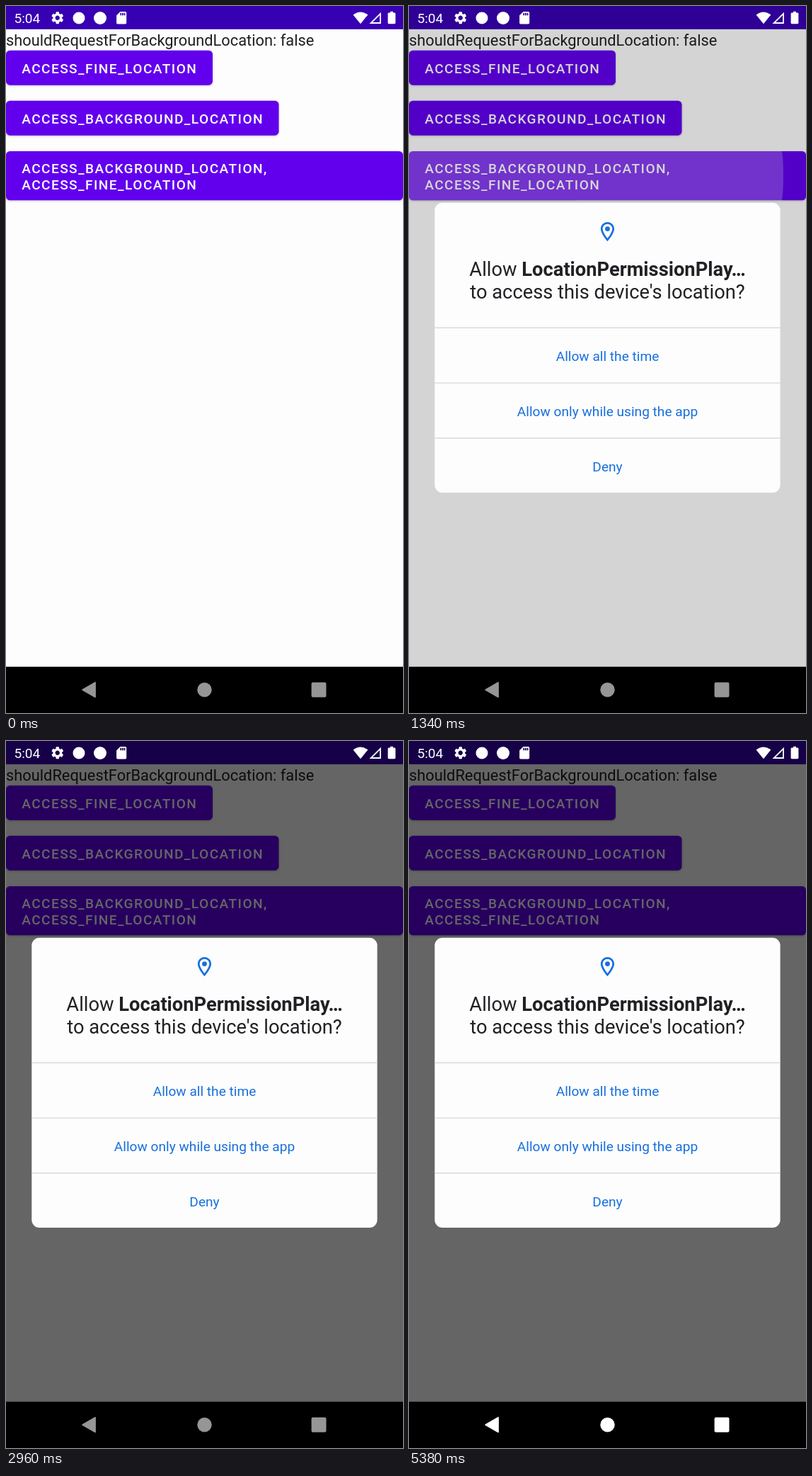
An HTML page for the animation above (5.42 s loop, 561x998 px).

```html
<!DOCTYPE html>
<html lang="en">
<head>
<meta charset="utf-8">
<title>Location permission dialog</title>
<style>
  html, body { margin: 0; width: 100%; height: 100%; overflow: hidden; background: #000; }
  svg { display: block; width: 561px; height: 998px; font-family: Roboto, sans-serif; }
  .label { font-size: 21.84px; fill: #1f1f1f; }
  .button { fill: #6200ee; filter: drop-shadow(0 1.5px 1.5px rgba(0, 0, 0, .22)); }
  .caps { font-size: 19.11px; font-weight: 500; letter-spacing: 1.42px; fill: #fff; }
  .title { font-size: 27.3px; fill: #202124; text-anchor: middle; }
  .title tspan { font-weight: 700; }
  .choice { font-size: 19.11px; fill: #176fde; text-anchor: middle; }
  .rule { stroke: #d9d9e0; stroke-width: 1.4; }
  .clock { font-size: 19.11px; }

  .ripple, .dim, .dialog, .keys, .glow { animation: 5420ms linear infinite; }
  .ripple { animation-name: spread; opacity: 0; }
  .dim { animation-name: dim; opacity: 0; }
  .dialog { animation-name: show; opacity: 0; }
  .keys { animation-name: wake; }
  .glow { animation-name: glow, widen; opacity: 0; }

  @keyframes spread {
    0%, 22.36% {
      opacity: 0;
      transform: translate(155px, 239.5px) scale(168);
      animation-timing-function: cubic-bezier(.4, 0, .2, 1);
    }
    26.51% { opacity: .24; transform: translate(280.5px, 239.5px) scale(284); }
    29.28%, 100% { opacity: 0; transform: translate(280.5px, 239.5px) scale(284); }
  }
  @keyframes dim {
    0%, 23.76% { opacity: 0; }
    27.45%, 100% { opacity: .6; }
  }
  @keyframes show {
    0%, 23.79% { opacity: 0; }
    23.8%, 100% { opacity: 1; }
  }
  @keyframes wake {
    0%, 65.31% { opacity: .59; }
    67.16%, 100% { opacity: 1; }
  }
  @keyframes glow {
    0%, 65.3% { opacity: 0; }
    65.31% { opacity: .2; }
    66.42% { opacity: .2; animation-timing-function: cubic-bezier(0, 0, .8, 1); }
    74.72%, 100% { opacity: 0; }
  }
  @keyframes widen {
    0%, 65.31% { x: 117.5px; width: 0; animation-timing-function: cubic-bezier(0, .5, .2, 1); }
    68.08%, 100% { x: 45px; width: 145px; }
  }
  /* Opacity of the press ripple is split from its spread so it can fade in faster. */
  .press { animation: press 5420ms linear infinite; }
  @keyframes press {
    0%, 22.36% { opacity: 0; }
    23.75%, 26.51% { opacity: .24; }
    29.28%, 100% { opacity: 0; }
  }
  @keyframes spread {
    0%, 22.36% {
      transform: translate(155px, 239.5px) scale(168);
      animation-timing-function: cubic-bezier(.4, 0, .2, 1);
    }
    26.51%, 100% { transform: translate(280.5px, 239.5px) scale(284); }
  }
  .ripple { opacity: 1; }
</style>
</head>
<body>
<svg viewBox="0 0 561 998">
  <defs>
    <clipPath id="wide"><rect y="205" width="561" height="69.3" rx="5.5"/></clipPath>
  </defs>

  <!-- App -->
  <rect width="561" height="933" fill="#fdfdfd"/>
  <rect width="561" height="32.8" fill="#3700b3"/>
  <text class="label" x="0" y="56">shouldRequestForBackgroundLocation: false</text>
  <rect class="button" y="62.7" width="292" height="49" rx="5.5"/>
  <rect class="button" y="133.7" width="385.5" height="49" rx="5.5"/>
  <rect class="button" y="205" width="561" height="69.3" rx="5.5"/>
  <g clip-path="url(#wide)"><g class="press"><circle class="ripple" r="1" fill="#fff"/></g></g>
  <g class="caps">
    <text x="22.2" y="94.7">ACCESS_FINE_LOCATION</text>
    <text x="22.2" y="165.7">ACCESS_BACKGROUND_LOCATION</text>
    <text x="22.2" y="236.2">ACCESS_BACKGROUND_LOCATION,</text>
    <text x="22.2" y="258.6">ACCESS_FINE_LOCATION</text>
  </g>
  <rect class="dim" width="561" height="933"/>

  <!-- Dialog -->
  <g class="dialog">
    <rect x="36.3" y="277.7" width="488.3" height="409.3" rx="10.9" fill="#fdfdfd"/>
    <g transform="translate(264.1 302.3) scale(1.365)" fill="#176fde">
      <path d="M12 2C8.13 2 5 5.13 5 9c0 5.25 7 13 7 13s7-7.75 7-13c0-3.87-3.13-7-7-7zM7 9c0-2.76 2.24-5 5-5s5 2.24 5 5c0 2.88-2.88 7.19-5 9.88C9.92 16.21 7 11.85 7 9z"/>
      <circle cx="12" cy="9" r="2.5"/>
    </g>
    <text class="title" x="280.5" y="380.5">Allow <tspan>LocationPermissionPlay…</tspan></text>
    <text class="title" x="280.5" y="412.5">to access this device's location?</text>
    <path class="rule" d="M36.3 454.2h488.3M36.3 532.1h488.3M36.3 610h488.3"/>
    <text class="choice" x="280.5" y="500.6">Allow all the time</text>
    <text class="choice" x="280.5" y="578.6">Allow only while using the app</text>
    <text class="choice" x="280.5" y="656.6">Deny</text>
  </g>

  <!-- Status bar -->
  <g fill="#fff">
    <text class="clock" x="11.5" y="23.7">5:04</text>
    <path transform="translate(62.2 6.2) scale(.88)" d="M19.14 12.94c.04-.3.06-.61.06-.94 0-.32-.02-.64-.07-.94l2.03-1.58c.18-.14.23-.41.12-.61l-1.92-3.32c-.12-.22-.37-.29-.59-.22l-2.39.96c-.5-.38-1.03-.7-1.62-.94l-.36-2.54c-.04-.24-.24-.41-.48-.41h-3.84c-.24 0-.43.17-.47.41l-.36 2.54c-.59.24-1.13.57-1.62.94l-2.39-.96c-.22-.08-.47 0-.59.22L2.74 8.87c-.12.21-.08.47.12.61l2.03 1.58c-.05.3-.09.63-.09.94s.02.64.07.94l-2.03 1.58c-.18.14-.23.41-.12.61l1.92 3.32c.12.22.37.29.59.22l2.39-.96c.5.38 1.03.7 1.62.94l.36 2.54c.05.24.24.41.48.41h3.84c.24 0 .44-.17.47-.41l.36-2.54c.59-.24 1.13-.56 1.62-.94l2.39.96c.22.08.47 0 .59-.22l1.92-3.32c.12-.22.07-.47-.12-.61l-2.01-1.58zM12 15.6c-1.98 0-3.6-1.62-3.6-3.6s1.62-3.6 3.6-3.6 3.6 1.62 3.6 3.6-1.62 3.6-3.6 3.6z"/>
    <circle cx="103" cy="17" r="8.5"/>
    <circle cx="133" cy="17" r="9"/>
    <path transform="translate(152.6 6.2) scale(.88)" d="M18 2h-8L4 8v12c0 1.1.9 2 2 2h12c1.1 0 2-.9 2-2V4c0-1.1-.9-2-2-2zm-6 6h-2V4h2v4zm3 0h-2V4h2v4zm3 0h-2V4h2v4z"/>
    <path d="M501 25.2L490.6 12.4Q501 4.6 511.4 12.4Z"/>
    <path d="M529 10.8V24H515.6Z" fill="none" stroke="#fff" stroke-width="1.8"/>
    <path d="M543 7.8h4v1.8h2q1.4 0 1.4 1.4v12.8q0 1.4-1.4 1.4h-8q-1.4 0-1.4-1.4V11q0-1.4 1.4-1.4h2z"/>
  </g>

  <!-- Navigation bar -->
  <rect y="932.7" width="561" height="65.3"/>
  <rect class="glow" x="45" y="932.7" width="145" height="65.3" rx="32.6" fill="#fff"/>
  <g class="keys" fill="#fff">
    <path d="M108.2 965.2L126 955v20.4z" stroke="#fff" stroke-width="1.8" stroke-linejoin="round"/>
    <circle cx="280.5" cy="965.2" r="10.2"/>
    <rect x="431.6" y="954.8" width="20.9" height="20.9" rx="2"/>
  </g>
</svg>
</body>
</html>
```
